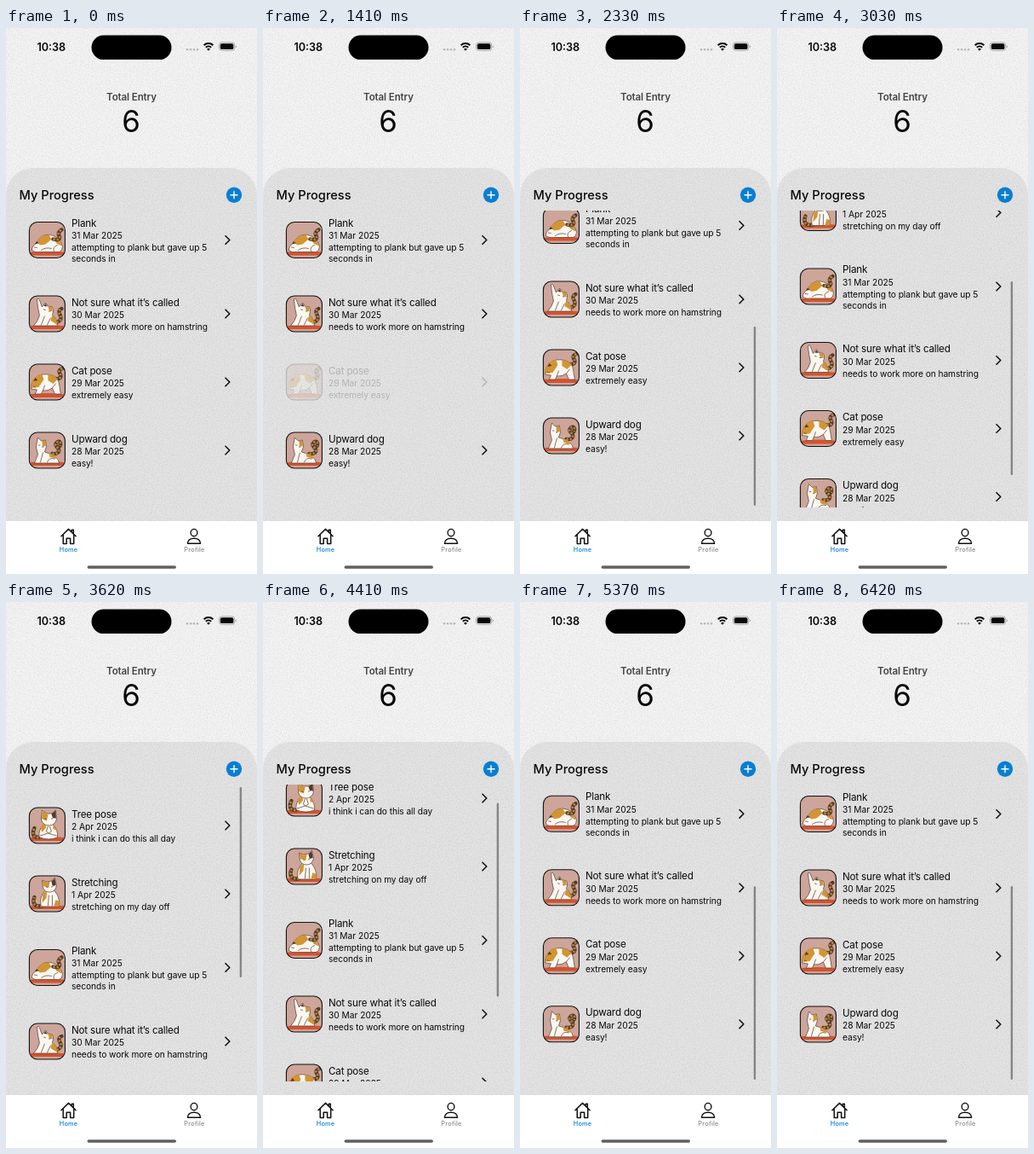
An HTML page for the animation above (6.53 s loop, 295 by 640 pixels).

```html
<!DOCTYPE html>
<html lang="en">
<head>
<meta charset="utf-8">
<title>My Progress</title>
<style>
  html, body { margin: 0; width: 100%; height: 100%; overflow: hidden; background: #f4f4f4; }
  svg { display: block; width: 100vw; height: 100vh; font-family: Inter, Roboto, sans-serif; fill: #080808; }
  .line { fill: none; stroke: #111; stroke-linecap: round; stroke-linejoin: round; }
  .title { font-size: 11.6px; letter-spacing: -.16px; }
  .date { font-size: 10.2px; }
  .note { font-size: 10.2px; letter-spacing: -.06px; }
  .tab { font-size: 7.3px; font-weight: 500; letter-spacing: .25px; text-anchor: middle; }
</style>
</head>
<body>
<svg viewBox="0 0 295 640">
  <defs>
    <filter id="grain" x="0" y="0" width="100%" height="100%">
      <feTurbulence type="fractalNoise" baseFrequency=".8" numOctaves="2" seed="4"/>
      <feColorMatrix values="0 0 0 0 0  0 0 0 0 0  0 0 0 0 0  .16 0 0 0 -.06"/>
    </filter>
    <clipPath id="view"><rect y="214" width="295" height="348"/></clipPath>
    <clipPath id="card"><rect width="42" height="42" rx="9.5"/></clipPath>
  </defs>

  <rect width="295" height="640" fill="#f4f4f4"/>
  <path d="M0 640V196a32 32 0 0 1 32-32H263a32 32 0 0 1 32 32V640z" fill="#e4e4e4"/>
  <rect width="295" height="578" filter="url(#grain)"/>

  <g id="status">
    <text x="36.4" y="26.5" font-size="12.6" font-weight="600">10:38</text>
    <rect x="100.5" y="8.5" width="94" height="28.6" rx="14.3" fill="#000"/>
    <g fill="#b5b5b5">
      <circle cx="213" cy="25.3" r="1.2"/><circle cx="217" cy="25.3" r="1.2"/>
      <circle cx="221" cy="25.3" r="1.2"/><circle cx="225" cy="25.3" r="1.2"/>
    </g>
    <path d="M232.6 20.2a7.8 7.8 0 0 1 10.8 0M234.8 22.7a4.7 4.7 0 0 1 6.4 0" fill="none" stroke="#080808" stroke-width="1.9"/>
    <path d="M238 26.8l-1.9-2.1a2.8 2.8 0 0 1 3.8 0z"/>
    <rect x="250.5" y="17" width="18.2" height="9.4" rx="3" fill="none" stroke="#999" stroke-width=".8"/>
    <rect x="251.8" y="18.3" width="15.6" height="6.8" rx="1.9"/>
    <path d="M269.8 20.2a1.6 1.6 0 0 1 0 3z" fill="#999"/>
  </g>

  <g text-anchor="middle">
    <text x="147.5" y="85.2" font-size="11.5" font-weight="600" letter-spacing="-.1" fill="#444">Total Entry</text>
    <text x="147" y="121.5" font-size="34.8">6</text>
  </g>
  <text x="15.6" y="201.3" font-size="14.6" font-weight="500">My Progress</text>
  <circle cx="268" cy="195.7" r="9.2" fill="#087fd1"/>
  <path d="M264 195.7h8M268 191.7v8" stroke="#fff" stroke-width="1.4" stroke-linecap="round"/>

  <g clip-path="url(#view)"><g id="list"></g></g>
  <rect id="bar" x="274.7" width="2.4" rx="1.2" fill="#858585"/>

  <rect y="578" width="295" height="62" fill="#fff"/>
  <path class="line" stroke-width="1.5" d="M64.9 595.7l8.6-8.3 8.6 8.3M67.2 593.8v10.6h4v-6.2h4.4v6.2h4.1v-10.6M79.3 592.4v-4.2h-2v2.2"/>
  <text class="tab" x="73.6" y="613.6" fill="#087fd1">Home</text>
  <g class="line" stroke-width="1.4">
    <ellipse cx="221" cy="591.6" rx="3.9" ry="4.2"/>
    <path d="M213.4 604.3c.4-4.2 3.6-6 7.6-6s7.2 1.8 7.6 6z"/>
  </g>
  <text class="tab" x="221.5" y="613.6" fill="#8a8a8a">Profile</text>
  <rect x="95.5" y="630.2" width="104.5" height="3.6" rx="1.8" fill="#606060"/>
</svg>

<script>
const LOOP = 6530, MAX = 176;
const list = document.getElementById('list');
const bar = document.getElementById('bar');

const WHITE = '#faf6f0', ORANGE = '#d29531', DARK = '#503a2e';
const shape = (fill, d) => `<path d="${d}" fill="${fill}"/>`;
const body = d => `<path d="${d}" fill="${WHITE}" stroke="${DARK}" stroke-width=".7" stroke-linejoin="round"/>`;
const mark = d => `<path d="${d}" fill="none" stroke="${DARK}" stroke-width=".7" stroke-linecap="round"/>`;
const tail = d => `<path d="${d}" fill="none" stroke="${DARK}" stroke-width="4.4" stroke-linecap="round"/>
  <path d="${d}" fill="none" stroke="#b98434" stroke-width="2.9" stroke-dasharray="2.2 1.9"/>`;

const cats = {
  tree: tail('M11 35C4 35 3 30 6 24') +
    body('M12 35c-2-6 2-13 6-16h9c4 3 7 10 6 16q-10 4-21 0z') +
    shape(ORANGE, 'M13 22l5-4 2 5-5 6zM28 19l5 8-5-2z') +
    body('M14 14l1-11 5 4h6l5-4 1 11q-2 7-9 7t-9-7z') +
    shape(ORANGE, 'M14.5 13l.8-9 5 3.5 2 1-2 7z') + shape(DARK, 'M26 7.5l4.8-3.8.7 9-4-1z') +
    mark('M22 22l-2 6 3 2 3-2-2-6M13 33l9-3 10 3M18 13l2 .5M26 13l2-.5'),
  sit: tail('M15 35C7 37 3 32 6 25') +
    body('M14 36c-2-7 0-14 5-19h10c5 5 7 12 6 19z') +
    shape(ORANGE, 'M16 21l5-4-1 9-5 6zM31 28l4 2v6h-6z') +
    body('M16 14l-1-9 5 2 6-1 4-4 2 10q-2 7-8 7t-8-5z') +
    shape(ORANGE, 'M16 12l-.5-6.5L20 7.4l4-.6-1 7z') + shape(DARK, 'M26 6.5l3.8-3.6 1.5 8-4 1z') +
    mark('M23 23l-1 12M27 23v12M20 13l1.5.5M26 13l1.5-.5'),
  plank: body('M3 33c0-4 3-7 6-9 2-6 9-10 15-9 9 1 14 8 15 14q0 5-4 6H12q-6 1-9-2z') +
    shape(ORANGE, 'M9 24c2-6 8-9 14-9l3 5-7 6-6 1zM29 17q8 4 9 11l-6-3z') +
    shape(DARK, 'M6.5 26l2-3.6 3 2.4z') +
    tail('M28 20c6 2 9-1 7-4s1-6 3-7') +
    mark('M6 29.5l3 .6M14 33q5-4 12-2M29 34q-2-5 4-7'),
  leg: tail('M32 31c6-2 6-6 4-9s-1-6 2-7') +
    body('M5 35q5-5 7-12-2-8-3-19 2-2 3 1l3 8 4-5 3 4 5 1c2 4 1 7 0 9q6 5 6 13z') +
    shape(ORANGE, 'M22 12l5 1.5 .3 5-4-1zM27 22q5 4 6 12l-8-5z') + shape(DARK, 'M17 12l2-3 2.4 3.4z') +
    mark('M18 24l-4 10M25 26l-4 8M17 16l2 .5M23 18h1.5'),
  arch: tail('M31 17c6 1 7-3 5-6s0-5 3-6') +
    body('M2 29c0-9 5-16 14-17 10-1 18 3 19 11 1 4 1 8 2 12h-7l-3-7q-5 4-11 3l-2 4H7l2-5z') +
    shape(ORANGE, 'M2 28c0-9 5-16 13-16l2 6-6 9zM22 12q8 1 11 6l-5 5-6-4z') +
    shape(DARK, 'M5 20l2-4 3 3z') +
    mark('M27 28l4-5M16 31l2-6M5 26l2 1'),
  dog: tail('M27 25c7 1 9-3 7-6s-5-4-2-7 6 0 4 4') +
    body('M6 36l4-10-2-9 2-11 4 4 5-1 1 8-2 6q9 2 13 6 4 3 4 7z') +
    shape(ORANGE, 'M15 10l3.7-.6 .8 6.6-4 1zM23 24q7 2 10 7l-9-2z') +
    mark('M11 15h1.5M15 17h1.5M16 24l-3 11M21 35q2-6 9-4')
};

const thumb = pose => `<g clip-path="url(#card)">
  <rect width="42" height="42" fill="#cda59a"/>
  <path d="M2 35q19-2 38 0l2 4H0z" fill="#d4532f"/>${cats[pose]}</g>
  <rect width="42" height="42" rx="9.5" fill="none" stroke="#111" stroke-width="1.1"/>`;

const entries = [
  ['tree', 'Tree pose', '2 Apr 2025', 'i think i can do this all day'],
  ['sit', 'Stretching', '1 Apr 2025', 'stretching on my day off'],
  ['plank', 'Plank', '31 Mar 2025', 'attempting to plank but gave up 5', 'seconds in'],
  ['leg', 'Not sure what it’s called', '30 Mar 2025', 'needs to work more on hamstring'],
  ['arch', 'Cat pose', '29 Mar 2025', 'extremely easy'],
  ['dog', 'Upward dog', '28 Mar 2025', 'easy!']
];

let y = 244;
list.innerHTML = entries.map(([pose, title, date, ...notes]) => {
  const mid = notes.length > 1 ? 20.5 : 14;
  const html = `<g transform="translate(0 ${y})">
    <g transform="translate(27.4 ${mid - 21})">${thumb(pose)}</g>
    <text class="title" x="77" y="4.6">${title}</text>
    <text class="date" x="77" y="19">${date}</text>
    ${notes.map((n, i) => `<text class="note" x="77" y="${33.1 + i * 13}">${n}</text>`).join('')}
    <path class="line" stroke-width="1.6" d="M258 ${mid - 4.8}l4.8 4.8-4.8 4.8"/></g>`;
  y += notes.length > 1 ? 93 : 80;
  return html;
}).join('');
const pressed = list.children[4];

// The screen refreshes in runs of [first, last, count] and holds in between.
const ticks = [[0, 0, 1], [1410, 1410, 1], [1570, 2120, 6], [2230, 2650, 5], [2820, 3030, 3],
  [3150, 3370, 3], [3480, 3480, 1], [3620, 3860, 3], [4290, 4850, 6], [4950, 5370, 5], [6420, 6420, 1]]
  .flatMap(([a, b, n]) => Array.from({ length: n },
    (_, i) => n > 1 ? Math.floor((a + (b - a) * i / (n - 1)) / 10) * 10 : a));
const held = t => ticks.filter(k => k <= t).pop();

// Scroll path as [time, offset]: pull past the end, flick to the top, flick back.
const path = [[0, 176], [1540, 176], [1680, 187], [1900, 209], [2130, 222], [2230, 210], [2330, 193],
  [2450, 182], [2550, 178], [2650, 176.4], [2760, 176], [2820, 170], [2930, 150], [3030, 121.5],
  [3150, 80], [3260, 38], [3370, 6], [3480, -9], [3620, -4], [3740, -1.2], [3860, 0], [4240, 0],
  [4290, 6], [4400, 28], [4510, 68], [4630, 115], [4740, 158], [4850, 190], [4920, 198],
  [4950, 197.5], [5050, 189], [5160, 181], [5270, 177.5], [5370, 176.2], [5460, 176], [LOOP, 176]];

const rate = i => (path[i + 1][1] - path[i][1]) / (path[i + 1][0] - path[i][0]);
function slope(i) {
  if (i < 1 || i > path.length - 2) return 0;
  const a = rate(i - 1), b = rate(i);
  return a * b > 0 ? 2 * a * b / (a + b) : 0;
}
function scrollAt(t) {
  const i = path.findIndex((p, k) => k + 1 === path.length - 1 || t < path[k + 1][0]);
  const [t0, a] = path[i], [t1, b] = path[i + 1];
  const d = t1 - t0, u = (t - t0) / d, v = 1 - u;
  return a * v * v * (1 + 2 * u) + b * u * u * (1 + 2 * v)
    + d * u * v * (v * slope(i) - u * slope(i + 1));
}

function pressAt(t) {
  if (t < 1410) return 1;
  return t < 1570 ? .2 : Math.min(1, .2 + .8 * (t - 1500) / 250);
}

function draw(time) {
  const t = held(time), pos = scrollAt(t);
  list.setAttribute('transform', `translate(0 ${-pos.toFixed(2)})`);
  pressed.setAttribute('opacity', pressAt(t));
  const inside = Math.min(MAX, Math.max(0, pos));
  const size = 227 - Math.abs(pos - inside);
  bar.setAttribute('height', size);
  bar.setAttribute('y', 217 + (343 - size) * inside / MAX);
  bar.setAttribute('opacity', t < 1570 ? 0 : 1);
}

const start = performance.now();
function frame() {
  draw((performance.now() - start) % LOOP);
  requestAnimationFrame(frame);
}
frame();
</script>
</body>
</html>
```
